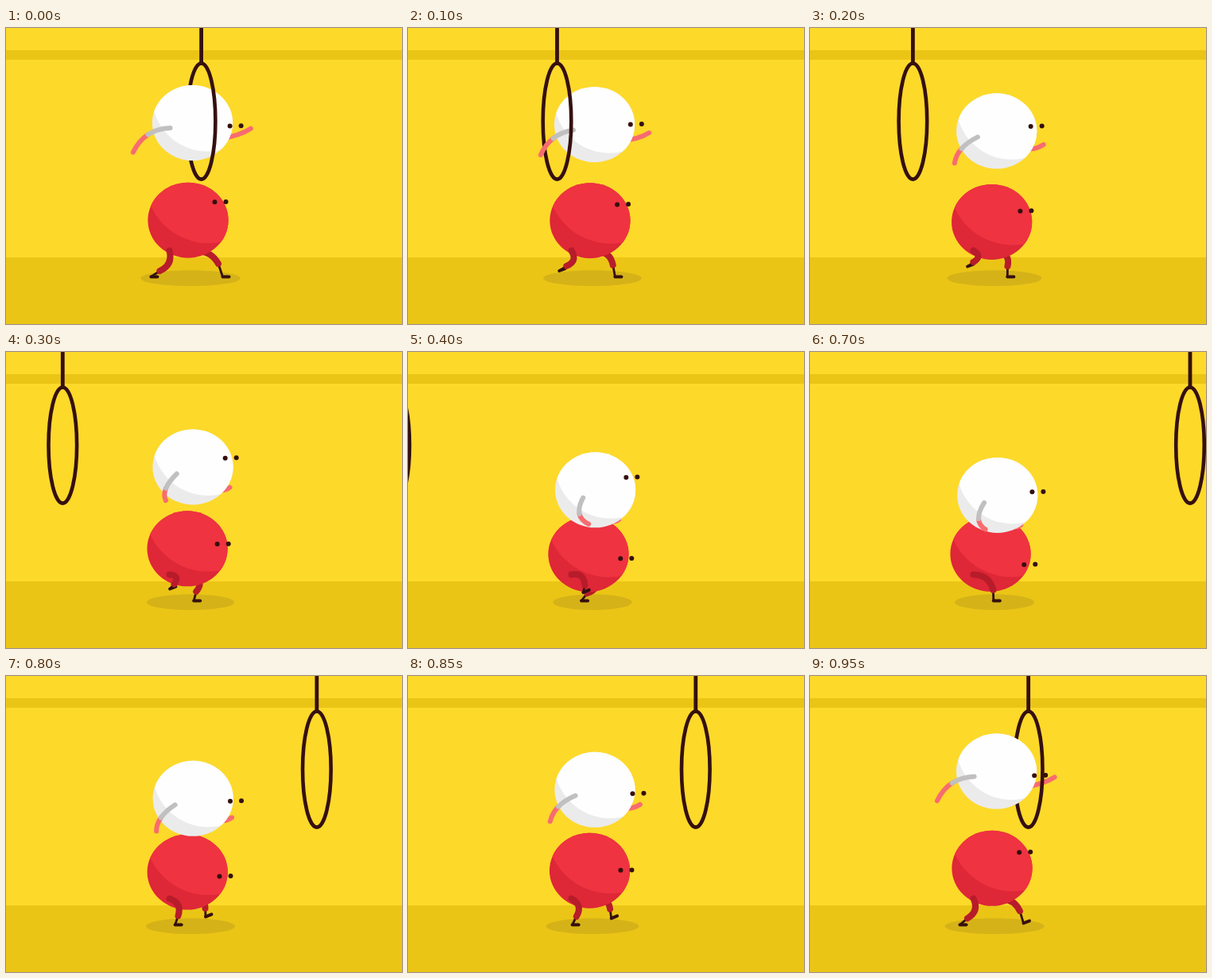
Recreate the animation shown at these times as an HTML page with a canvas. Size 498 by 373 pixels, loop 1 s.

```html
<!DOCTYPE html>
<html lang="en">
<head>
<meta charset="utf-8">
<title>Hoop run</title>
<style>
  html, body { margin: 0; width: 100%; height: 100%; overflow: hidden; background: #fdd92a; }
  canvas { display: block; width: 498px; height: 373px; }
</style>
</head>
<body>
<canvas id="stage" width="498" height="373"></canvas>
<script>
const W = 498, H = 373, LOOP = 1000, STEP = 50, BEATS = 24, HALF = BEATS / 2;
const g = document.getElementById('stage').getContext('2d');

const DARK = '#35100f', LEG = '#b71c2a', SKIN = '#f76c70', SLEEVE = '#c1bfc0', BAND = '#ebc516';
const GROUND = 313.5, PACE = 6.05;

const wrap = k => (k % BEATS + BEATS) % BEATS;
const ease = t => (1 - Math.cos(Math.PI * t)) / 2;
const mix = (a, b, t) => a + (b - a) * t;

// Eases from a (at beat t0) to b (at beat t1) and back again, once per loop.
// The powers skew the timing of each way.
function swing(k, a, b, t0, t1, out, back) {
  const p = wrap(k - t0), n = t1 - t0;
  const t = p < n ? ease((p / n) ** out) : 1 - ease(((p - n) / (BEATS - n)) ** back);
  return mix(a, b, t);
}

// land: where the heel touches down; axis: where the shin stands upright.
const nearLeg = {
  hipX: 205.5, hipY: 280.5, land: 255, axis: 229, phase: HALF,
  reach: q => .65 * q + .35 * q ** 8,
  lift: q => 15 * Math.sin(Math.PI * q)
};
const farLeg = {
  hipX: 236, hipY: 282, land: 272.5, axis: 249, phase: 0,
  reach: q => q ** .65,
  lift: q => 15 * Math.sin(Math.PI * Math.sqrt(q))
};

function stroke(color, width, path) {
  g.strokeStyle = color;
  g.lineWidth = width;
  g.lineCap = g.lineJoin = 'round';
  g.beginPath();
  path();
  g.stroke();
}

function oval(x, y, rx, ry, color) {
  g.fillStyle = color;
  g.beginPath();
  g.ellipse(x, y, rx, ry, 0, 0, 7);
  g.fill();
}

function ball(x, y, light, shade, lx, ly, lr) {
  g.save();
  g.beginPath();
  g.ellipse(x, y, 50.6, 47.5, 0, 0, 7);
  g.clip();
  g.fillStyle = shade;
  g.fillRect(x - 60, y - 60, 120, 120);
  oval(x + lx, y + ly, lr, lr, light);
  g.restore();
}

function eyes(x, y) {
  oval(x, y, 3, 3, DARK);
  oval(x + 14, y - .4, 3, 3, DARK);
}

// The foot slides back on the ground for half a loop, then swings forward.
function leg(k, { hipX, hipY, land, axis, phase, reach, lift }) {
  const t = wrap(k + phase), q = Math.max(0, t / HALF - 1);
  const up = q && lift(q), tilt = q ? -.38 : 0;
  const hx = q ? land - PACE * HALF * (1 - reach(q)) : land - PACE * t;
  const hy = GROUND - up;

  const lean = .235 * (axis - hx);
  const cx = hx + lean, cy = hy - 13.4 + .55 * lean + .3 * up;

  const dx = cx - hipX, dy = cy - hipY, bend = 12 / Math.hypot(dx, dy);
  const kneeX = hipX + dx / 2 + dy * bend, kneeY = hipY + dy / 2 - dx * bend;

  stroke(DARK, 2.8, () => { g.moveTo(cx, cy); g.lineTo(hx, hy); });
  stroke(DARK, 4, () => {
    g.moveTo(hx, hy);
    g.lineTo(hx + 8 * Math.cos(tilt), hy + 8 * Math.sin(tilt));
  });
  stroke(LEG, 8, () => { g.moveTo(hipX, hipY); g.quadraticCurveTo(kneeX, kneeY, cx, cy); });
}

function farArm(x, y, u) {
  const hx = x + 73.5 - 49 * u, hy = y + 7 + 34 * u;
  stroke(SKIN, 6, () => {
    g.moveTo(x + 35 - 20 * u, y + 20);
    g.quadraticCurveTo(hx - 14, hy + 9, hx, hy);
  });
}

// One quadratic curve, split in the middle into sleeve and skin.
function nearArm(x, y, u) {
  const h = 74 * u - 75;
  const s = [x - 28 + 14 * u, y + 6.5 + 3.7 * u];
  const m = [x - 56 + 40 * u, y + 14.5 + 30 * u - 14 * u * u];
  const e = [x + h, y + 43 - 6 * ((h + 10) / 65) ** 2];
  const c = m.map((v, i) => 2 * v - (s[i] + e[i]) / 2);
  const half = p => p.map((v, i) => (v + c[i]) / 2);
  stroke(SKIN, 6, () => { g.moveTo(...m); g.quadraticCurveTo(...half(e), ...e); });
  stroke(SLEEVE, 6, () => { g.moveTo(...s); g.quadraticCurveTo(...half(s), ...m); });
}

function hoop(x, front) {
  const q = Math.PI / 2;
  stroke(DARK, 4.6, () => g.ellipse(x, 117.5, 17.8, 73, 0, -q, q, !front));
}

function scenery(squash) {
  g.fillStyle = '#fdd92a';
  g.fillRect(0, 0, W, H);
  g.fillStyle = BAND;
  g.fillRect(0, 28, W, 12);
  g.fillRect(0, 289, W, H - 289);
  oval(232, 315.3, 48.3 + 14.3 * (1 - squash) ** 2, 10, '#d5b318');
}

function runner(k, x, y) {
  const look = swing(k, -23, 14, .2, 14, .85, 1.6);
  leg(k, farLeg);
  ball(x, y, '#ef3340', '#de2737', 26, -51, 80);
  leg(k, nearLeg);
  eyes(x + 39 + .24 * look, y + look);
}

function jumper(k, x, y) {
  const look = -5 + 11 * Math.cos(2 * Math.PI * (k - 21.7) / BEATS);
  farArm(x, y, swing(k, 0, 1.04, -.5, 12, 1, 1.35));
  ball(x, y, '#fdfefd', '#ebebec', 19, -34, 70);
  nearArm(x, y, swing(k, 0, 1.04, -.5, 12, 1, 1.1));
  eyes(x + 45.4 + .42 * look, y + look);
}

function draw(k) {
  const squash = swing(k, 0, 1, -.5, 13, 1.35, .75);
  const jumpY = swing(k, 119.5, 189, -.5, 12, 1.35, 1.4);
  const hoopX = 245.6 - 29.05 * (k < HALF ? k : k - BEATS);

  scenery(squash);
  stroke(DARK, 4.8, () => { g.moveTo(hoopX, -5); g.lineTo(hoopX, 44); });
  hoop(hoopX, false);
  runner(k, 229 - 3 * squash, 242.2 + 18.3 * squash);
  jumper(k, 234.5 + (jumpY - 120) * .02, jumpY);
  hoop(hoopX, true);
}

// Twenty held poses per loop; every fourth step later on skips a beat.
function beatAt(ms) {
  const i = Math.floor((ms % LOOP) / STEP);
  return i + Math.max(0, Math.floor((i - 3) / 4));
}

const start = performance.now();
function tick(now) {
  draw(beatAt(Math.max(0, now - start)));
  requestAnimationFrame(tick);
}
draw(0);
requestAnimationFrame(tick);
</script>
</body>
</html>
```
